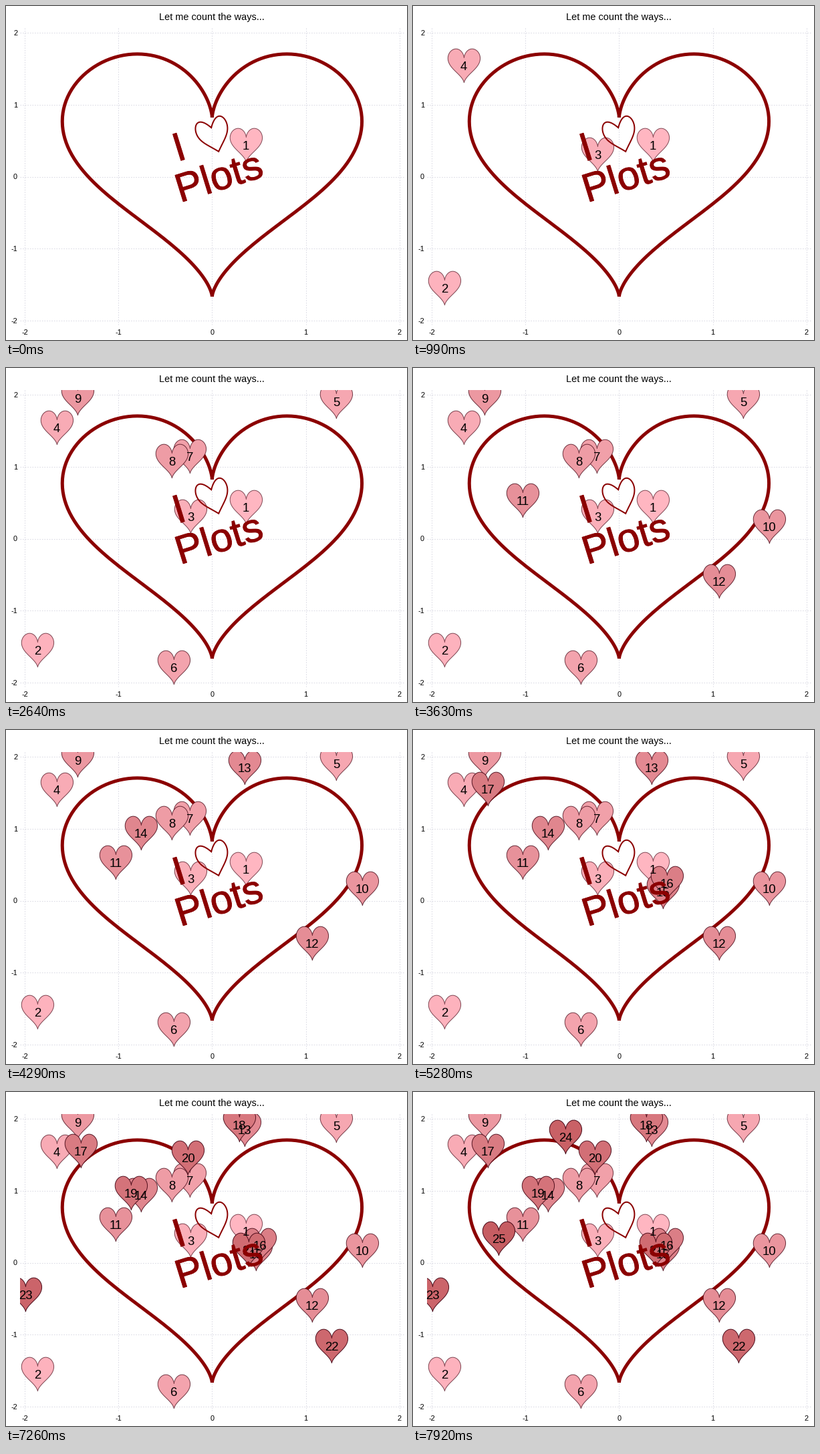
Write a matplotlib script that moves like this. It is 600x500 px and loops after 8 s.

```python
import numpy as np
import matplotlib.pyplot as plt
from matplotlib.animation import FuncAnimation
from matplotlib.patches import Polygon, Rectangle
from matplotlib.patheffects import withStroke

W, H, DPI = 600, 500, 100
LOOP, STEP, BEAT = 8000, 40, 330      # ms
PT = 72 / DPI                         # points per pixel
TILT = 17.2                           # degrees
DARK = np.array([139, 0, 0]) / 255
PINK = np.array([255, 182, 193]) / 255
SHADES = 50                           # steps from PINK to DARK

# one key point per heart, in order of appearance
SPOTS = [
    (359, 208), (47, 422), (276, 222), (76, 89), (494, 50),
    (251, 448), (275, 132), (248, 139), (107, 45), (533, 237),
    (164, 198), (458, 319), (357, 56), (202, 154), (374, 242),
    (380, 229), (112, 88), (349, 49), (187, 151), (272, 98),
    (363, 236), (487, 380), (29, 303), (228, 67), (128, 219),
]

plt.rcParams["font.family"] = "Liberation Sans"
fig = plt.figure(figsize=(W / DPI, H / DPI), dpi=DPI, facecolor="white")
ax = fig.add_axes([0, 0, 1, 1])
ax.set(xlim=(0, W), ylim=(H, 0))
ax.axis("off")
frame = Rectangle((21, 32.5), 575, 444.5, transform=ax.transData)


def px(x, y):
    return 308.4 + 140.1 * x, 255.5 - 107.75 * y


def heart(power=3):
    """Heart curve; a lower power gives fuller sides."""
    t = np.linspace(0, 2 * np.pi, 241)
    s = np.sin(t)
    x = 1.6 * np.sign(s) * np.abs(s) ** power
    y = (1.495 * np.cos(t) - 0.595 * np.cos(2 * t) - 0.25 * np.cos(3 * t)
         - 0.126 * np.cos(4 * t) + 0.3)
    return x, y


def small_heart(cx, cy, size, tilt=0, power=3, **style):
    x, y = heart(power)
    c, s = np.cos(np.radians(tilt)), np.sin(np.radians(tilt))
    pts = np.column_stack([cx + size * (x * c - y * s),
                           cy - size * (x * s + y * c)])
    patch = Polygon(pts, joinstyle="miter", **style)
    ax.add_patch(patch)
    patch.set_clip_path(frame)
    return patch


def label(x, y, text, size, ha="center", **style):
    """Text whose capitals are centred on y."""
    return ax.text(x, y + 0.35 * size, text, fontsize=size * PT, ha=ha,
                   va="baseline", **style)


def tilted(x, y, text, ha):
    ax.text(x, y, text, fontsize=60 * PT, color=DARK, ha=ha, va="baseline",
            rotation=TILT, rotation_mode="anchor", zorder=5,
            path_effects=[withStroke(linewidth=1 * PT, foreground=DARK)])


# grid, ticks and title
grid = dict(color="#d9d9e3", lw=1 * PT, ls=(0, (1.6, 2)), zorder=0)
for v in range(-2, 3):
    gx, gy = px(v, v)
    ax.plot([gx, gx], [32.5, 477], **grid)
    ax.plot([21, 596], [gy, gy], **grid)
    label(gx, 488, str(v), 11)
    label(17, gy, str(v), 11, ha="right")
label(308, 16, "Let me count the ways...", 14.5)

# large outline and slogan
ax.plot(*px(*heart()), color=DARK, lw=5 * PT, solid_capstyle="butt",
        solid_joinstyle="bevel", zorder=1)
small_heart(310.8, 194, 15, TILT, power=2, fill=False, ec=DARK, lw=2 * PT,
            zorder=5)
tilted(264.5, 230.5, "I", "center")
tilted(260.5, 294.3, "Plots", "left")

# numbered hearts
pairs = []
for i, (x, y) in enumerate(SPOTS):
    k = i / (SHADES - 1)
    body = small_heart(x + 0.4, y + 0.9, 15.1, fc=PINK + (DARK - PINK) * k,
                       ec=(0.25, 0, 0.06, 0.65 + 0.6 * k), lw=1 * PT,
                       zorder=2 + i / 100)
    pairs.append((body, label(x + 0.2, y + 0.3, str(i + 1), 18.6, zorder=4)))


def update(n):
    count = 1 + (n * STEP + STEP - 10) // BEAT
    for i, pair in enumerate(pairs):
        for artist in pair:
            artist.set_visible(i < count)
    return [artist for pair in pairs for artist in pair]


anim = FuncAnimation(fig, update, frames=LOOP // STEP, interval=STEP,
                     init_func=lambda: update(0), repeat=True, repeat_delay=0)
plt.show()
```
